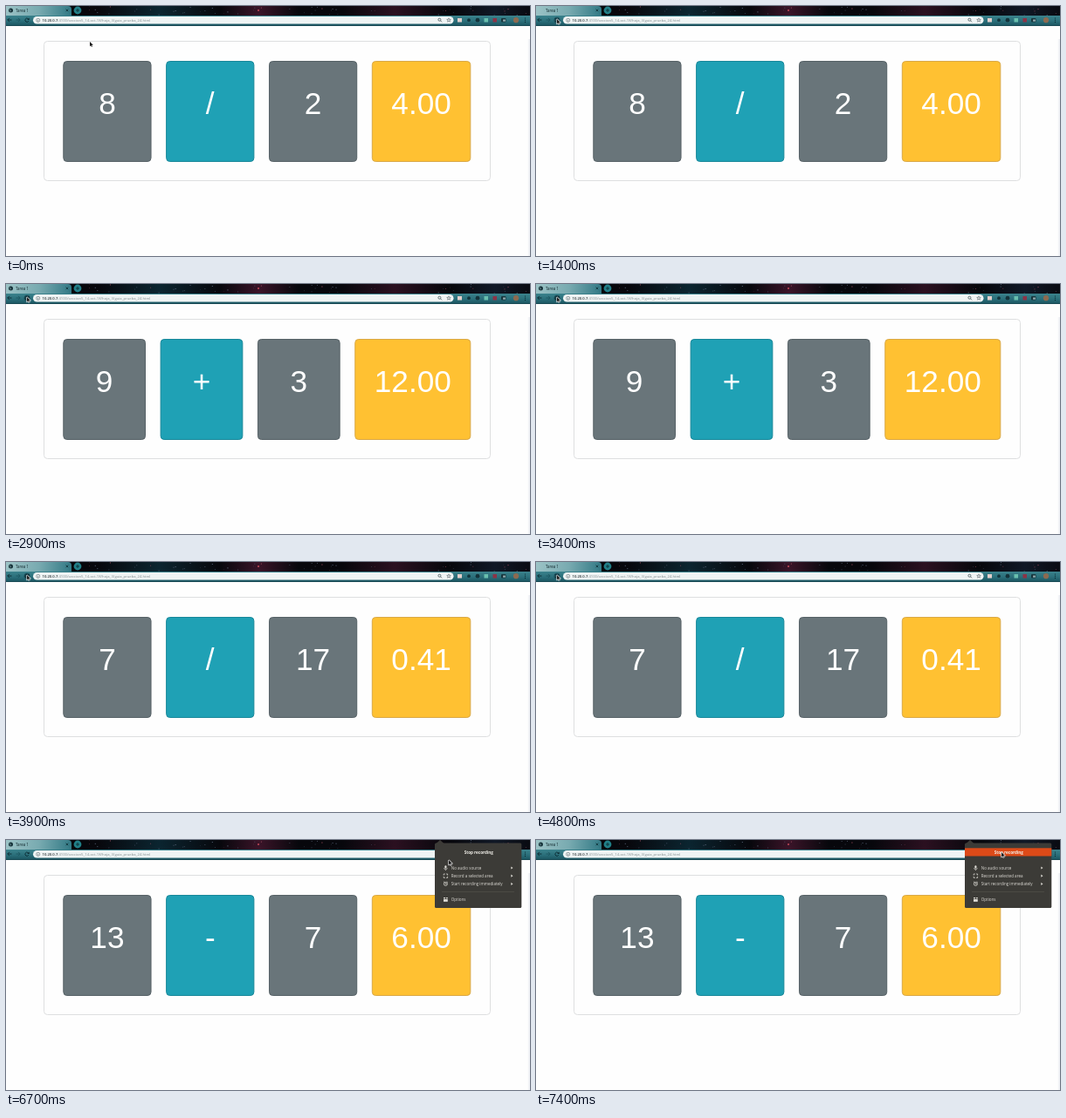
An HTML page with a canvas for the animation above (7.6 s loop, 600x287 px).

```html
<!DOCTYPE html>
<html lang="es">
<head>
<meta charset="utf-8">
<title>Tarea 1</title>
<style>
html, body { margin: 0; width: 100%; height: 100%; overflow: hidden; background: #fefefe; }
canvas { display: block; }
</style>
</head>
<body>
<canvas id="stage" width="600" height="287"></canvas>
<script>
const ctx = document.getElementById('stage').getContext('2d');
const LOOP = 7600;
const UI = '"Open Sans", "Noto Sans", sans-serif';
const DARK = '#0b2a31';

const sums = [
  [0, '8', '/', '2', '4.00'],
  [2800, '9', '+', '3', '12.00'],
  [3800, '7', '/', '17', '0.41'],
  [5000, '13', '-', '7', '6.00']
];
const loads = [[1100, 1500], [2500, 2800], [3500, 3800], [4700, 5000]];
// time, x, y of the pointer tip
const path = [
  [0, 96, 41], [400, 24, 15], [5300, 24, 15], [5500, 150, 40], [5700, 150, 40],
  [5900, 400, -12], [6200, 496, -12], [6300, 497, 2], [6500, 500, 13], [6700, 507, 23],
  [6900, 515, 28], [7200, 530, 21], [7400, 533, 14], [LOOP, 533, 14]
];
const MENU_AT = 6300, HOVER_AT = 7300;

function rect(x, y, w, h, fill) {
  ctx.fillStyle = fill;
  ctx.fillRect(x, y, w, h);
}

function round(x, y, w, h, r, fill, stroke) {
  ctx.beginPath();
  ctx.roundRect(x, y, w, h, r);
  if (fill) { ctx.fillStyle = fill; ctx.fill(); }
  if (stroke) { ctx.strokeStyle = stroke; ctx.lineWidth = 1; ctx.stroke(); }
}

function disc(x, y, r, fill) {
  ctx.beginPath();
  ctx.arc(x, y, r, 0, 7);
  ctx.fillStyle = fill;
  ctx.fill();
}

function ring(x, y, r, color, width = .7, from = 0, to = 7) {
  ctx.beginPath();
  ctx.arc(x, y, r, from, to);
  ctx.strokeStyle = color;
  ctx.lineWidth = width;
  ctx.stroke();
}

function shape(points) {
  ctx.beginPath();
  for (let i = 0; i < points.length; i += 2) ctx.lineTo(points[i], points[i + 1]);
}

function line(color, width, ...points) {
  shape(points);
  ctx.strokeStyle = color;
  ctx.lineWidth = width;
  ctx.stroke();
}

function poly(color, ...points) {
  shape(points);
  ctx.fillStyle = color;
  ctx.fill();
}

function text(str, x, y, font, color, align = 'left') {
  ctx.font = font;
  ctx.fillStyle = color;
  ctx.textAlign = align;
  ctx.fillText(str, x, y);
  return ctx.measureText(str).width;
}

function gradient(x0, y0, x1, y1, ...colors) {
  const g = ctx.createLinearGradient(x0, y0, x1, y1);
  colors.forEach((c, i) => g.addColorStop(i / (colors.length - 1), c));
  return g;
}

function drawTabs(loading) {
  rect(0, 0, 600, 11, '#07070c');
  for (const [x, w, c] of [[175, 70, '#0b2530'], [290, 45, '#3a1428'], [445, 60, '#2b1020'], [560, 50, '#101826']]) {
    rect(x - w, 0, w * 2, 11, gradient(x - w, 0, x + w, 0, c + '00', c, c + '00'));
  }
  let seed = 11;
  const rand = () => (seed = seed * 16807 % 2147483647) / 2147483647;
  for (let i = 0; i < 55; i++) {
    const x = 95 + rand() * 500, y = rand() * 10, s = .4 + rand() * .6;
    rect(x, y, s, s, i % 4 ? '#66748a' : '#b0566a');
  }
  disc(289, 5, 1, '#c44a5a');

  round(-3, 0, 78, 14, [0, 4, 0, 0], gradient(0, 0, 76, 9, '#9cc3c6', '#78aab0', '#2f7783'));
  if (!loading) {
    disc(5.5, 5, 2.5, '#17333a');
    line('#8fb5b9', .6, 3.8, 4.2, 5.5, 5, 4.8, 6.5);
  }
  text('Tarea 1', 11, 6.8, '4.4px ' + UI, '#10262b');
  line(DARK, .8, 68.6, 3.6, 71.2, 6.2);
  line(DARK, .8, 71.2, 3.6, 68.6, 6.2);
  disc(82, 5, 4.4, '#217f88');
  line(DARK, .8, 80, 5, 84, 5);
  line(DARK, .8, 82, 3, 82, 7);
}

function drawToolbar(loading, hover) {
  rect(0, 11, 600, 12, gradient(0, 11, 0, 23, '#3a828c', '#2b707b', '#1a535f'));
  rect(0, 22, 600, 1, '#1b4c56');
  line(DARK, .9, 6.5, 16, 1.8, 16);
  line(DARK, .9, 4, 13.8, 1.8, 16, 4, 18.2);
  line('#1b5560', .9, 11.5, 16, 16, 16);
  line('#1b5560', .9, 14, 13.8, 16.2, 16, 14, 18.2);
  if (hover) disc(24, 16.2, 3.4, '#1b4d58');
  if (loading) {
    line(DARK, .9, 22, 14.2, 26, 18.2);
    line(DARK, .9, 26, 14.2, 22, 18.2);
  } else {
    ring(24, 16.2, 2.1, DARK, .9, .5, 5.6);
    poly(DARK, 26.6, 13.4, 26.6, 16, 24.2, 16);
  }

  round(31, 12, 481.5, 8.6, 4.3, '#eff4f4');
  ring(36.7, 16.3, 2, '#59666a', .6);
  line('#59666a', .7, 36.7, 15.9, 36.7, 17.4);
  const font = '4.2px ' + UI;
  const w = text('10.20.0.7', 41.5, 17.9, '600 ' + font, '#2d3639');
  text(':4100/seccion5_14-oct-18/hoja_3/guia_prueba_24.html', 41.5 + w, 17.9, font, '#858e91');
  ring(496.4, 15.7, 1.5, '#46555a', .8);
  line('#46555a', .8, 497.5, 16.8, 499, 18.3);
  const star = [];
  for (let i = 0; i < 11; i++) {
    const a = i * Math.PI / 5 - Math.PI / 2, r = i % 2 ? 1 : 2.4;
    star.push(507 + r * Math.cos(a), 16.2 + r * Math.sin(a));
  }
  line('#59666a', .6, ...star);

  rect(517, 14, 5, 4.5, '#e2cfcb');
  disc(530, 16.2, 1.9, '#12353d');
  disc(540, 16.2, 2.4, '#14333b');
  rect(547.5, 14, 4.5, 4.5, '#69bfae');
  rect(557.5, 14, 4.5, 4.5, '#8c3347');
  round(567, 14, 5.5, 4.5, 1, '#17343b');
  rect(569, 15.5, 3, 2.2, '#8fa9ad');
  disc(584, 16.2, 3.1, '#8d6a50');
  for (const y of [14, 16.2, 18.4]) disc(594.5, y, .6, DARK);
}

function drawPage(values) {
  rect(0, 23, 600, 264, '#fefefe');
  rect(597, 38, 3, 249, gradient(597, 0, 600, 0, '#fefefe', '#e9ecf1'));
  round(43.5, 40.5, 511, 160, 4, null, '#dedfe0');
  const font = '35.2px "Liberation Sans", Arial, sans-serif';
  const fills = ['#69757a', '#1fa1b5', '#69757a', '#ffc132'];
  const edges = ['#566166', '#178799', '#566166', '#d9a846'];
  const gap = 16.6;
  ctx.font = font;
  // the result keeps its own width; the other cards share the rest
  const last = ctx.measureText(values[3]).width + 45;
  const share = (467 - 3 * gap - last) / 3;
  values.forEach((v, i) => {
    const x = 65.3 + i * (share + gap), w = i < 3 ? share : last;
    round(x + .5, 63.5, w - 1, 115, 4, fills[i], edges[i]);
    text(v, x + w / 2, 124, font, '#fff', 'center');
  });
}

function drawMenu(hover) {
  const ink = '#dedcd6', font = '4.55px ' + UI;
  poly('#3c3b37', 492.5, 4, 497, 0, 501.5, 4);
  round(491, 3.5, 99.3, 74.5, 1.5, '#3c3b37', null);
  if (hover) rect(491, 9.3, 99.3, 9.2, '#dd4a18');
  text('Stop recording', 541.3, 15.6, 'bold 4.6px ' + UI, '#f2f0ea', 'center');
  ['No audio source', 'Record a selected area', 'Start recording immediately', 'Options'].forEach((label, i) => {
    const y = i < 3 ? 32 + i * 9.2 : 68.7;
    text(label, 509.7, y + 1.7, font, ink);
    if (i < 3) poly(ink, 578.3, y - 1.6, 580.5, y, 578.3, y + 1.6);
  });
  rect(499, 59, 83, .6, '#56544e');

  round(502.4, 29.3, 2, 3.5, 1, ink);
  ring(503.4, 32, 1.9, ink, .6, 0, Math.PI);
  line(ink, .7, 503.4, 33.8, 503.4, 35);
  for (const sx of [-1, 1]) for (const sy of [-1, 1]) {
    const x = 503.4 + 2.2 * sx, y = 41.2 + 2.2 * sy;
    line(ink, .8, x - 1.5 * sx, y, x, y, x, y - 1.5 * sy);
  }
  ring(503.4, 50.4, 2, ink, .8);
  line(ink, .7, 503.4, 49.2, 503.4, 50.6, 504.5, 50.6);
  line(ink, .7, 501, 48.6, 502, 47.7);
  line(ink, .7, 505.8, 48.6, 504.8, 47.7);
  rect(501, 68, 4.8, 2.8, ink);
  rect(501, 66, 2, 1.3, ink);
  rect(503.8, 66, 2, 1.3, ink);
}

function drawPointer(t) {
  const i = path.findIndex(p => p[0] > t);
  const [t0, x0, y0] = path[i - 1], [t1, x1, y1] = path[i];
  const k = (t - t0) / (t1 - t0);
  ctx.save();
  ctx.translate(x0 + (x1 - x0) * k, y0 + (y1 - y0) * k);
  const arrow = [0, 0, 0, 5.2, 1.2, 4.2, 2, 6, 2.9, 5.6, 2.1, 3.9, 3.7, 3.8, 0, 0];
  line('#f4f4f4', 1.2, ...arrow);
  poly('#1c1c1c', ...arrow);
  ctx.restore();
}

function draw(now) {
  const t = Math.floor(now % LOOP / 100) * 100;
  const loading = loads.some(([a, b]) => t >= a && t < b);
  const sum = sums.filter(s => s[0] <= t).pop();
  drawTabs(loading);
  drawToolbar(loading, t >= 400 && t < 5400);
  drawPage(sum.slice(1));
  if (t >= MENU_AT) drawMenu(t >= HOVER_AT);
  drawPointer(t);
}

const start = performance.now();
function tick() {
  draw(performance.now() - start);
  requestAnimationFrame(tick);
}
tick();
</script>
</body>
</html>
```
